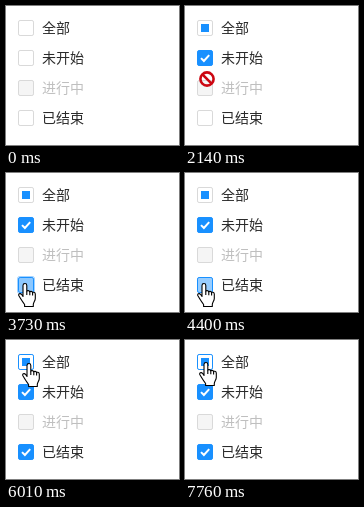
These frames come from a looping animation (173x139 px, 8000 ms). An HTML page:

```html
<!DOCTYPE html>
<html lang="zh-CN">
<head>
<meta charset="utf-8">
<style>
html, body { margin: 0; width: 100%; height: 100%; overflow: hidden; background: #fff; }
svg { display: block; width: 173px; height: 139px; }
text { font: 14px "Noto Sans CJK SC", "Noto Sans CJK", sans-serif; fill: #2b2b2b; }
</style>
</head>
<body>
<svg id="stage" viewBox="0 0 173 139">
  <g id="rows"></g>
  <g id="arrow" fill="#fff" stroke="#000">
    <path d="M.5.7V16.4L4.1 13 6.5 18.5 9 17.4 6.6 12H11.4Z"/>
  </g>
  <g id="hand" fill="#fff" stroke="#000" stroke-width="1.1" stroke-linejoin="round">
    <path d="M5 13.5V2.4a1.9 1.9 0 0 1 3.8 0V8.6c0-1.4 3-1.4 3 .6 0-1.3 2.8-1.2 2.8.7 0-1.1 2.7-1 2.7 1V15.5c0 2.5-2 4-2 6v2H6.6v-2C5 19.5 2.5 15.5.9 12.8c-1-1.8 1.3-3 2.6-1.5Z"/>
    <path fill="none" d="M8.8 8.6V12M11.8 9.2V12.2M14.6 9.9V12.5"/>
  </g>
  <g id="deny" fill="none" stroke="#cc0712" stroke-width="2.6">
    <circle cx="8" cy="8" r="6.6"/>
    <path d="M3.4 3.4 12.6 12.6"/>
  </g>
</svg>
<script>
const LOOP = 8000, BLUE = [24, 144, 255], GREY = [217, 217, 217], WHITE = [255, 255, 255];
const labels = ['全部', '未开始', '进行中', '已结束'];
const $ = id => document.getElementById(id);

// Pointer: [start ms, shape, x, y]
const pointer = [
  [0, ''], [900, 'arrow', 117, 90], [1050, 'arrow', 92, 60], [1170, 'hand', 60, 32],
  [1290, 'hand', 50, 39], [1440, 'hand', 22, 44], [1560, 'hand', 14, 46], [1990, 'hand', 14, 49],
  [2140, 'deny', 14, 65], [2260, 'deny', 12, 72], [2380, 'deny', 10, 77], [2910, 'deny', 9, 79],
  [3030, 'hand', 11, 105], [3180, 'hand', 11, 110], [3330, 'hand', 12, 110],
  [4940, 'hand', 17, 94], [5060, 'hand', 19, 60], [5180, 'hand', 18, 36], [5300, 'hand', 16, 24],
  [6010, 'hand', 16, 23], [6850, 'hand', 16, 20], [7000, 'hand', 13, 18], [7120, 'hand', 11, 17],
  [7490, 'hand', 10, 21], [7760, 'hand', 14, 22]
];
// Per row: [start ms, amount]
const hover = [
  [[0, 0], [1170, .4], [1290, .8], [1440, .4], [1560, 0], [5300, .4], [5450, 1]],
  [[0, 0], [1440, .4], [1560, 1]],
  [[0, 0]],
  [[0, 0], [3180, 1], [4940, 0]]
];
const fill = [
  [[0, 0]],
  [[0, 0], [1840, .5], [1990, 1]],
  [[0, 0]],
  [[0, 0], [3730, .5], [3880, 1], [4400, .45], [4520, 0], [4790, .4], [4940, 1]]
];
// Click ripple: [start ms, row, size, opacity]
const ripple = [
  [0, -1], [1840, 1, 17, .4], [1990, 1, 23, .15], [2140, -1],
  [3730, 3, 17, .4], [3880, 3, 23, .15], [4030, -1], [4790, 3, 15.6, .4], [4940, -1]
];

const at = (keys, t) => keys.findLast(k => k[0] <= t);
const mix = (a, b, k) => `rgb(${a.map((v, i) => Math.round(v + (b[i] - v) * k))})`;

$('rows').innerHTML = labels.map((label, i) => `
  <g transform="translate(12 ${14 + 30 * i})">
    <rect class="box" x=".5" y=".5" width="15" height="15" rx="1.6"/>
    <rect class="dot" x="4" y="4" width="8" height="8" fill="#1890ff"/>
    <path class="tick" d="M4 8.1 6.9 11 12.2 5.2" fill="none" stroke="#fff" stroke-width="2"/>
    <rect class="ring" rx="2" fill="none" stroke="#1890ff"/>
    <text x="24" y="13"${i === 2 ? ' style="fill:#bfbfbf"' : ''}>${label}</text>
  </g>`).join('');

const rows = [...$('rows').children].map(g =>
  Object.fromEntries(['box', 'dot', 'tick', 'ring'].map(c => [c, g.querySelector('.' + c)])));
const set = (el, attrs) => { for (const k in attrs) el.setAttribute(k, attrs[k]); };

function draw(now) {
  const t = now % LOOP;
  const [, ringRow, size, opacity] = at(ripple, t);
  rows.forEach(({ box, dot, tick, ring }, i) => {
    const on = at(fill[i], t)[1], lit = at(hover[i], t)[1];
    set(box, {
      fill: i === 2 ? '#f5f5f5' : mix(WHITE, BLUE, on),
      stroke: mix(GREY, BLUE, Math.max(on, lit))
    });
    set(dot, { opacity: i === 0 && t >= 1990 ? 1 : 0 });
    set(tick, { opacity: on === 1 ? 1 : 0 });
    set(ring, { opacity: i === ringRow ? opacity : 0 });
    if (i === ringRow) set(ring, { x: 8 - size / 2, y: 8 - size / 2, width: size, height: size });
  });
  const [, shape, x, y] = at(pointer, t);
  for (const id of ['arrow', 'hand', 'deny']) {
    $(id).style.display = id === shape ? '' : 'none';
    if (id === shape) set($(id), { transform: `translate(${x} ${y})` });
  }
}

const start = performance.now();
(function tick() {
  draw(performance.now() - start);
  requestAnimationFrame(tick);
})();
</script>
</body>
</html>
```
